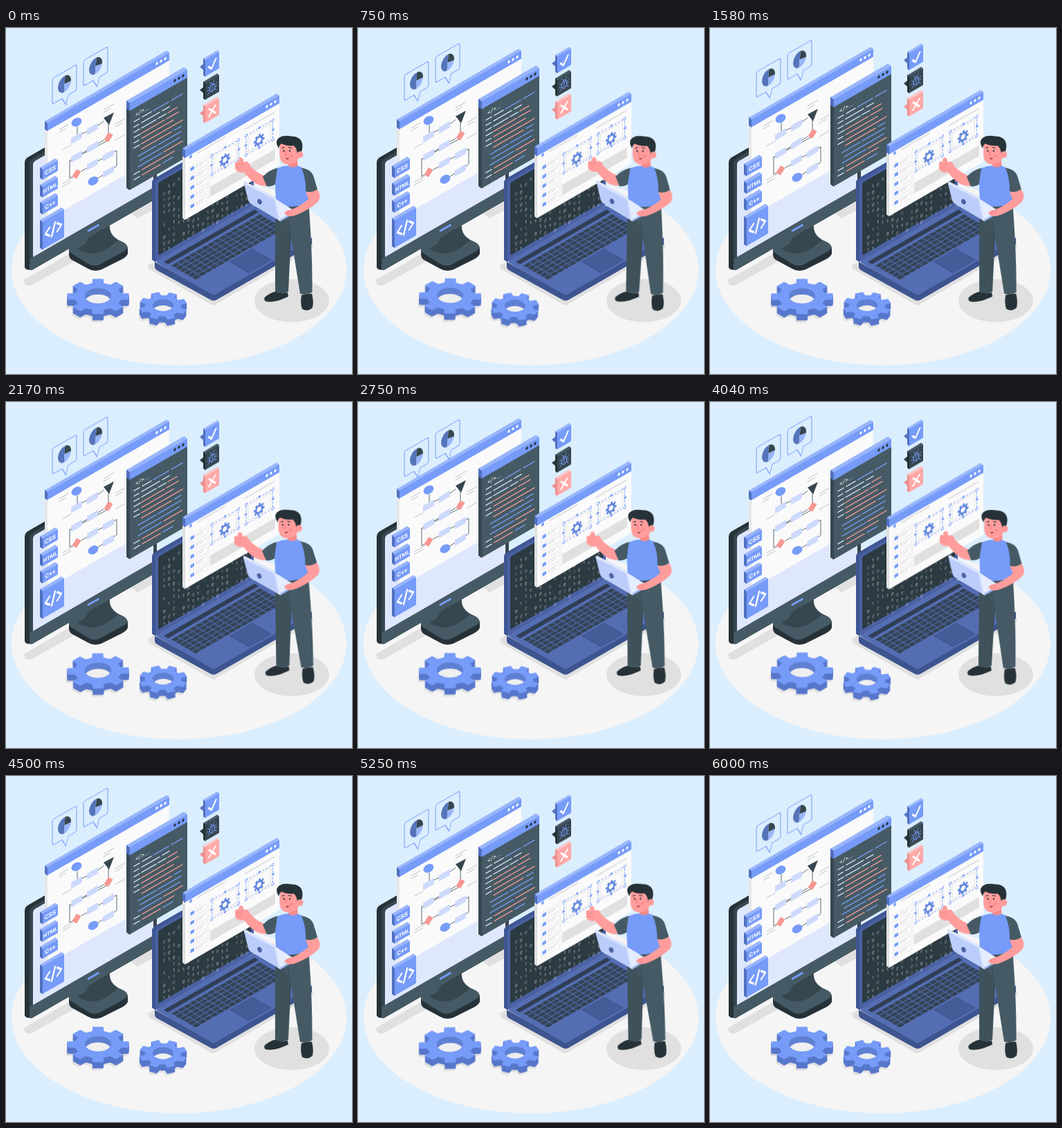
An HTML page that plays this animation: 500x500 px, repeating every 6040 ms.

```html
<!DOCTYPE html>
<html lang="en">
<head>
<meta charset="utf-8">
<title>Developer workspace</title>
<style>
html, body { margin: 0; width: 100%; height: 100%; overflow: hidden; background: #dbeefe; }
svg { display: block; width: 100vw; height: 100vh; }
text { font-family: Roboto, Arial, sans-serif; }
#person { transform-origin: 393px 282px; }
#gears { transform-origin: 175px 396px; }
</style>
</head>
<body>
<svg id="stage" viewBox="0 0 500 500" xmlns="http://www.w3.org/2000/svg"></svg>
<script>
const S = 0.577; // isometric slope
const BLUE = '#769bf8', LIGHT = '#98b5fb', DEEP = '#5070bf', PALE = '#cddafc';
const INK = '#263238', SLATE = '#37474f', STEEL = '#455a64', PINK = '#ffa8a7', SKIN = '#ff9d9c';
const GREY = '#e0e0e0';

// ---- drawing helpers ----
const group = (id, body) => `<g id="${id}">${body}</g>`;
const iso = (x, y, body) => `<g transform="matrix(1 ${-S} 0 1 ${x} ${y})">${body}</g>`;
const path = (d, fill, more = '') => `<path d="${d}" fill="${fill}" ${more}/>`;
const poly = (pts, fill, more = '') => `<polygon points="${pts}" fill="${fill}" ${more}/>`;
const rect = (x, y, w, h, fill, more = '') =>
  `<rect x="${x}" y="${y}" width="${w}" height="${h}" fill="${fill}" ${more}/>`;
const oval = (x, y, rx, ry, fill, more = '') =>
  `<ellipse cx="${x}" cy="${y}" rx="${rx}" ry="${ry}" fill="${fill}" ${more}/>`;
const line = (d, color, w = 1, more = '') =>
  `<path d="${d}" fill="none" stroke="${color}" stroke-width="${w}" stroke-linecap="round" stroke-linejoin="round" ${more}/>`;
const label = (x, y, size, str, more = '') =>
  `<text x="${x}" y="${y}" font-size="${size}" fill="#fff" ${more}>${str}</text>`;
const range = n => [...Array(n).keys()];

let seed = 7;
const random = () => (seed = seed * 16807 % 2147483647) / 2147483647;

// Slab facing front, with its left side and top edge showing.
function slab(x, y, w, h, d, front, side, top) {
  const k = d * S, r = w * S;
  const round = c => `stroke="${c}" stroke-width="1" stroke-linejoin="round"`;
  return poly(`${x},${y} ${x - d + 0.5},${y - k} ${x - d + 0.5},${y - k + h} ${x},${y + h}`, side, round(side)) +
    poly(`${x},${y} ${x - d + 1},${y - k} ${x - d + w},${y - k - r} ${x + w - 0.5},${y - r}`, top, round(top)) +
    iso(x, y, rect(0, 0, w, h, front, 'rx="1"'));
}

function panel(x, y, w, h, d, front, side, dot, body) {
  const dots = [18, 12, 6].map(k => oval(w - k, 5.5, 1.7, 2, dot)).join('');
  return slab(x, y + 11, w, h - 11, d, front, side, front) +
    slab(x, y, w, 11.5, d, BLUE, DEEP, LIGHT) + iso(x, y, dots + body);
}

function cog(cx, cy, rx, ry, turn = 0, root = 0.76) {
  const pts = [];
  for (const i of range(8)) {
    for (const [a, r] of [[-14, root], [-10, 1], [10, 1], [14, root]]) {
      const t = (i * 45 + a + turn) * Math.PI / 180;
      pts.push((cx + rx * r * Math.cos(t)).toFixed(2) + ' ' + (cy + ry * r * Math.sin(t)).toFixed(2));
    }
  }
  return 'M' + pts.join('L') + 'Z';
}

// ---- scene ----
function floor() {
  return oval(250, 349, 242, 138.5, '#f5f5f5') +
    path('M26 364L92 326L104 334L38 371Q32 374 27 370Z', GREY) +
    path('M205 343L216 336L300 384L442 304L444 317L304 399Q300 402 295 399L206 348Z', GREY) +
    path('M180 268L214 249V262L190 275Z', GREY) +
    oval(413, 394, 54, 31, GREY);
}

function monitor() {
  return path('M91 320Q93 315 103 310L147 284Q150 302 168 309Q177 313 176 321V326Q175 330 168 334L138 349Q128 353 119 348L95 335Q91 332 91 327Z', INK) +
    path('M91 320Q93 315 103 310L148 284Q150 302 168 309Q180 315 172 322L137 341Q128 346 119 341L95 326Q90 323 91 320Z', STEEL) +
    path('M103 318Q118 314 119 299L150 281Q148 299 162 307Q142 324 128 326Q113 326 103 318Z', SLATE) +
    path('M27 195Q27 189 32 186.500L212 83L218 86V246L39 348Q30 352 27 346Z', INK) +
    path('M34 197Q34 191 40 187.500L218 86V246L38 349.500Q33 351 34 346Z', SLATE) +
    path('M39 331L218 227.500V246L38 349.500Q34 351 34 346V334Z', STEEL) +
    path('M39 198Q39 194 42 192L213 94V230.500L39 331Z', '#dfe7fd') +
    line('M119 293L133.500 284.700', BLUE, 3);
}

function flowChart() {
  const box = (x, y) => iso(x, y, rect(-8, -4.5, 16, 9, PALE));
  const gem = (x, y) => poly(`${x},${y - 7} ${x + 6.5},${y - 3.5} ${x},${y + 7} ${x - 6.5},${y + 3.5}`, '#f79792');
  const notes = [[141, 118, 15], [141, 122, 10], [77, 147, 13], [77, 151, 9], [158, 139, 14], [158, 143, 10],
    [158, 162, 13], [82, 176, 12], [82, 225, 15], [82, 229, 12]];
  const wires = 'M103 143V154M110 153L118 149M133 141L141 135M148 138V152M141 162L133 167M118 176L110 181' +
    'M95 190L92 192V217L97 214M109 207L118 202M133 192L141 188M155 180L160 177V199L155 203M141 212L133 217M92 192L148 162';
  return line(wires, SLATE, 0.8) +
    notes.map(([x, y, w]) => line(`M${x} ${y}l${w} ${-w * S}`, '#a9b2b7', 0.8)).join('') +
    oval(102, 136, 8, 5.8, BLUE, 'transform="rotate(-32 102 136)"') +
    [[102, 159], [125, 146], [102, 186], [125, 172], [125, 197], [148, 184], [148, 208]].map(p => box(...p)).join('') +
    poly('141,130 156,122 149,140', SLATE) + gem(148, 158) + gem(102, 211) +
    oval(126, 221, 8, 5.8, BLUE, 'transform="rotate(-32 126 221)"');
}

function badge(y, h, str, size) {
  return slab(53, y, 22, h, 4, BLUE, DEEP, LIGHT) +
    iso(64, y - 11 * S, label(0, h / 2 + 3.3, size, str, 'font-weight="700" text-anchor="middle"'));
}

function tags() {
  return badge(204, 15, 'CSS', 8.5) + badge(229, 15.5, 'HTML', 7.5) + badge(254, 15, 'C++', 8.5) +
    slab(53, 280, 31, 40, 4, BLUE, DEEP, LIGHT) +
    iso(53, 280, line('M10 14L4 20L10 26M21 14L27 20L21 26M18 11L13 29', '#fff', 2.6));
}

function codePanel() {
  const tint = { w: '#d9e4fb', b: '#7a9ff9', p: '#f59d98' };
  const rows = ['w6-14 w18-31 b34-56 b60-76', 'w6-13 w17-43 w47-57', 'w6-14 w17-38 w41-52 p55-68',
    'w6-15 p17-50 p53-70', 'w6-13 p17-63', 'w6-14 p17-76', 'p17-60 b64-74', 'b12-38 b41-74', 'b15-72',
    'b12-46 p49-76', 'w6-14 p18-64', 'w6-14 p18-44 b48-62'];
  const code = rows.map((row, i) => row.split(' ').map(s => {
    const [a, b] = s.slice(1).split('-');
    return line(`M${a} ${31 + i * 7.6}H${b}`, tint[s[0]], 1.5);
  }).join('')).join('');
  return panel(179, 108, 83, 126, 5, STEEL, SLATE, INK,
    label(8, 25, 9, '&lt;/&gt;') + label(21, 25, 9, '...') + code);
}

function laptop() {
  const keys = range(6).map(r => range(15).map(i =>
    rect(7 + i * 8.6, 16 + r * 6, 7.6, 5, '#354457')).join('')).join('');
  const digits = range(18).map(c => range(11).map(r => random() < 0.3 ? '' :
    label(11 + c * 7, -98 + r * 9 + (c % 3) * 2, 6.2, random() < 0.5 ? 0 : 1,
      `opacity="${(0.35 + random() * 0.45).toFixed(2)}"`)).join('')).join('');
  return path('M215 338L300 385L442 303V312Q442 314 439 315L304 393Q300 395 296 393L218 350Q215 348 215 346Z', '#3d548f') +
    `<g transform="matrix(1 ${-S} 1 ${S} 216 338)">` +
    rect(0, 0, 142, 84, '#546db3', 'rx="3"') + rect(6, 6, 131, 6, '#2f3e55') + keys +
    rect(54, 54, 32, 27, '#465c98', 'stroke="#3d5288" stroke-width=".7"') + '</g>' +
    path('M211 226Q210 220 215 217L354 137L358 140V256L216 338L211 335Z', '#3f5694') +
    iso(216, 338, rect(0, -116, 142, 116, '#4a62a5', 'rx="4"') + rect(4, -112, 134, 105, '#2c3a42', 'rx="2"') + digits);
}

function frame(x, y) {
  const ring = ([a, b]) => oval(a, b, 1.7, 1.7, '#fff', `stroke="${BLUE}" stroke-width=".9"`);
  const knob = ([a, b]) => poly(`${a - 2.2},${b} ${a},${b - 2.2} ${a + 2.2},${b} ${a},${b + 2.2}`, BLUE);
  return iso(x, y, rect(3, 3, 32.5, 22, 'none', `stroke="${GREY}" stroke-width=".9"`) +
    rect(0, 0, 38.5, 28, 'none', `stroke="${BLUE}" stroke-width=".9" stroke-dasharray="3 1.7"`) +
    [[0, 0], [38.5, 0], [0, 28], [38.5, 28]].map(ring).join('') +
    [[19.2, -0.5], [19.2, 28.5], [-0.5, 14], [39, 14]].map(knob).join('') +
    path(cog(18.7, 17.5, 8, 8.8, 8, 0.74) + 'M15.500 17.500a3.200 3.500 0 1 0 6.400 0a3.200 3.500 0 1 0 -6.400 0Z', '#6488e0', 'fill-rule="evenodd"'));
}

function editor() {
  const items = range(5).map(i => {
    const y = 28 + i * 13.5;
    return rect(6, y, 26, 10.5, '#fff', 'stroke="#e8e8e8" stroke-width=".7"') + rect(7.5, y + 2.5, 5.5, 5, BLUE) +
      line(`M15 ${y + 3.5}H30M15 ${y + 6.5}H26`, '#cfcfcf', 1);
  }).join('');
  const body = oval(8, 14.5, 2, 2.3, BLUE) + items +
    line('M18 15H58M86 20H128', '#dedede', 2) + line('M34 20V90', '#ececec', 0.8) +
    rect(36, 74, 94, 15, GREY);
  return panel(259, 176, 136, 101, 4, '#fafafa', GREY, '#fff', body) + frame(297.5, 184) + frame(347, 155.5);
}

function bubble(x, y, turn) {
  const slice = (from, to, fill) => {
    const at = a => `${(17.5 + 9.5 * Math.cos(a * Math.PI / 180)).toFixed(2)} ${(18 + 11.5 * Math.sin(a * Math.PI / 180)).toFixed(2)}`;
    return path(`M17.500 18L${at(from)}A9.500 11.500 0 ${to - from > 180 ? 1 : 0} 1 ${at(to)}Z`, fill);
  };
  return iso(x, y, path('M2.500 0H32.500Q35 0 35 2.500V34.500Q35 37 32.500 37H23L19.500 49L14 37H2.500Q0 37 0 34.500V2.500Q0 0 2.500 0Z',
    'none', `stroke="${BLUE}" stroke-width="1"`) +
    slice(90 + turn, 275 + turn, '#5674ba') + slice(-85 + turn, 5 + turn, SLATE) + slice(5 + turn, 90 + turn, LIGHT));
}

function sign(y, front, side, top, icon) {
  return poly(`280,${y + 10} 288,${y + 4} 288,${y + 17}`, side) + slab(288, y, 20, 24, 3, front, side, top) + iso(288, y, icon);
}

function signs() {
  const bug = oval(10, 13, 3.5, 5, 'none', `stroke="${BLUE}" stroke-width="1"`) +
    line('M10 8V18M7.500 8Q10 4 12.500 8M8 5L6.500 3M12 5L13.500 3M6.500 11L3.500 8.500M6.500 13.500H3M6.500 16L4 19M13.500 11L16.500 8.500M13.500 13.500H17M13.500 16L16 19', BLUE, 0.9);
  return sign(46, BLUE, DEEP, LIGHT, line('M5 13L9 18L15.500 7', '#fff', 2.4)) +
    sign(79.5, SLATE, INK, STEEL, bug) +
    sign(113, PINK, '#ec8f8f', '#ffc3c2', line('M5.500 7L14.500 18M14.500 7L5.500 18', '#fff', 2.4));
}

function floorGear(id, x, y, rx, turn, hole) {
  const ry = rx * S, holeRy = hole * S;
  const shade = path(cog(x - 2, y + 12, rx, ry, turn), GREY);
  const sides = range(9).map(i => path(cog(x, y + 9 - i, rx, ry, turn), '#5777cb')).join('');
  return shade + sides + path(cog(x, y, rx, ry, turn), BLUE) +
    `<clipPath id="${id}">${oval(x, y - 1, hole, holeRy, '#000')}</clipPath>` +
    oval(x, y - 1, hole, holeRy, '#5f80d2') + oval(x, y + 8, hole, holeRy, '#efefef', `clip-path="url(#${id})"`);
}

function person() {
  const legs = path('M389 256L389 381Q398 386 408 381L412 300L424 262Z', '#3f525b') +
    path('M396 244L437 246C440 290 443 330 442.500 382Q434 387 425 384L411 296L398 270Z', STEEL) +
    line('M407 278L411 297L409 330', SLATE, 0.9);
  const shoes = path('M374 389Q381 383 389 381Q399 385 407 382L408 388Q399 392 393 394Q382 397 375 395Q372 392 374 389Z', INK) +
    path('M427 386Q434 384 442 384Q445 395 443 404Q436 411 428 406Q425 398 427 386Z', INK);
  const torso = path('M410 190H421L422 204Q414 209 407 203Z', '#f58b8b') +
    path('M392 203Q400 199 408 199Q414 204 421 199Q431 202 434 208Q438 225 436 252Q420 262 390 256L389 224Z', BLUE);
  const raisedArm = path('M350 195Q356 206 374 214L378 228Q360 231 343 207Z', SKIN) +
    path('M331 196Q331 192 336 193Q336 187 340 187Q344 189 343 194Q350 191 352 198Q351 205 346 208Q335 211 331 203Z', SKIN) +
    line('M333 198Q338 196 341 198M334 202L340 202M343 194L341 197', '#ee7f80', 0.8) +
    path('M393 202Q380 205 371 215L377 229Q387 229 391 224Z', STEEL);
  const device = poly('352,250 396,278 418,265 382,242', '#e5ecfe') +
    path('M396 277L418 264V267L396 280Z', '#9fb6ee') +
    path('M346 222L386 243Q389 244 390 248L396 279L354 254Q351 252 350 249L344 225Q343 221 346 222Z', '#bccdfb') +
    path('M346 222L386 243Q389 244 390 248L396 279L394 278L388 248L344 225Z', '#dce6fe') +
    oval(366.5, 251, 3, 4, '#4a629f', 'transform="rotate(-25 366.5 251)"');
  const loweredArm = path('M433 236Q443 238 450 233Q456 243 452 250Q440 262 420 270Q410 274 404 270Q400 267 406 264L416 261Q430 254 437 247Z', SKIN) +
    line('M405 267L412 265M407 270L413 268', '#ee7f80', 0.8) +
    path('M427 202Q440 204 444 213L450 233Q441 239 433 236Q434 219 427 202Z', STEEL);
  const head = path('M396 167Q394 184 397 191Q401 198 410 197Q421 196 424 185L423 167Z', SKIN) +
    path('M394 174Q388 164 394 159Q400 154 413 156.500Q426 157 428 167Q429.500 174 426 181L421 183Q421 175 416 170Q406 171 398 167Q395 169 394 174Z', INK) +
    oval(425, 183, 4.5, 4.8, SKIN) + line('M424 185Q424 181 427 181', '#ee7f80', 0.8) +
    oval(401.5, 177.5, 1, 1.5, INK) + oval(410, 177.5, 1, 1.5, INK) +
    line('M399 173.500L402 172.500M408.500 172.500L412.500 173.500', INK, 1.1) + line('M405 178L403.500 183H405.500', '#ee7176', 0.9) +
    oval(412.5, 185, 2.4, 1.7, '#fa8587') + path('M404 187.500Q407 188.500 409 187Q408.500 190.500 405.500 190Z', '#a83e48');
  return shoes + legs + raisedArm + torso + device + loweredArm + head;
}

document.getElementById('stage').innerHTML = floor() + monitor() +
  group('chart', panel(60, 137, 176, 140, 4, '#fafafa', '#e6e6e6', '#fff', '') + flowChart() + tags()) +
  group('code', codePanel()) + laptop() + group('editor', editor()) +
  group('bubbles', bubble(67, 73, 0) + bubble(112, 47, 5)) + group('signs', signs()) +
  group('gears', floorGear('holeA', 133, 388, 45, 0, 19) + floorGear('holeB', 227, 401.5, 35, -20, 15)) +
  group('person', person());

// ---- motion ----
const LOOP = 6040;
const drift = [0, -10, 0].map(y => ({ transform: `translateY(${y}px)` }));
const sway = [[0, 0], [0.25, 1], [0.75, -1], [1, 0]].map(([offset, a]) => ({ offset, transform: `rotate(${a}deg)` }));
const run = (ids, frames, duration) => ids.split(' ').forEach(id =>
  document.getElementById(id).animate(frames, { duration, iterations: Infinity, easing: 'linear' }));

run('chart code editor', drift, LOOP);
run('bubbles signs', drift, LOOP / 2);
run('gears person', sway, LOOP / 2);
</script>
</body>
</html>
```
